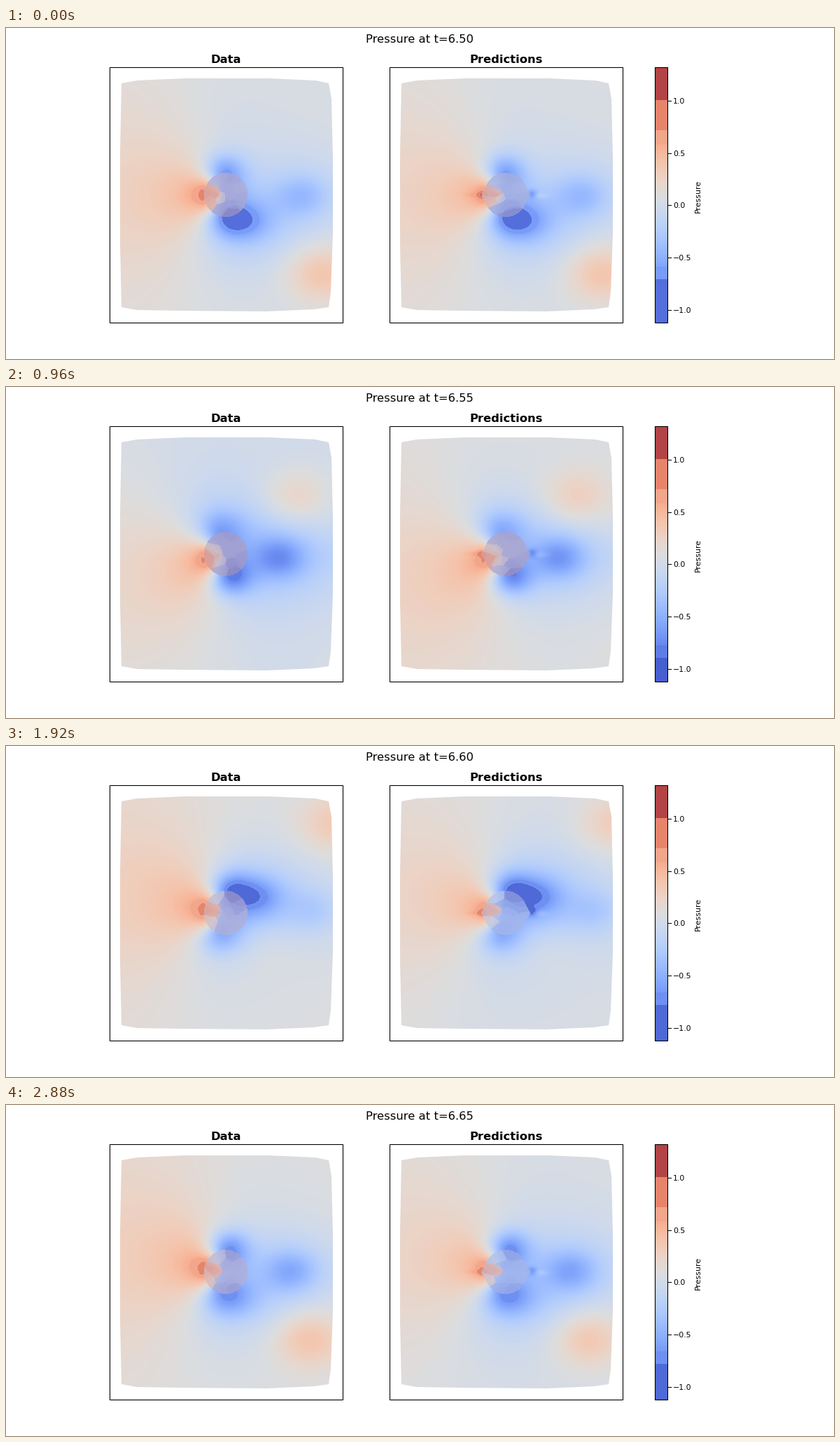
Recreate the animation shown at these times as a matplotlib script. Size 1183 by 473 pixels, loop 3.04 s.

```python
import numpy as np
import matplotlib.pyplot as plt
from matplotlib.animation import FuncAnimation
from matplotlib.colors import to_rgb
from matplotlib.patches import Polygon, Rectangle

W, H, DPI = 1183, 473, 100
FRAMES, STEP = 19, 160
VMIN, VMAX = -1.12, 1.32
TOP, BAR = 56.5, 364          # colour bar top and height in pixels
SHIFT = 400                   # distance between the two panels
PERIOD = 20                   # frames per vortex shedding cycle
X0, X1, Y0, Y1 = 160, 470, 70, 408
CX, CY, R = 314, 239, 31      # cylinder
X, Y = np.meshgrid(np.arange(X0, X1) + .5, np.arange(Y0, Y1) + .5)
BIG, SMALL, LINE = 11.83, 7.89, .79

plt.rcParams["font.family"] = "DejaVu Sans"


def wave(k, period=PERIOD):
    return np.cos(2 * np.pi * k / period)


def mix(a, b, t):
    return (1 - t) * np.array(to_rgb(a)) + t * np.array(to_rgb(b))


def blob(x, y, sx, sy, amp):
    return amp * np.exp(-((X - x) / sx) ** 2 / 2 - ((Y - y) / sy) ** 2 / 2)


def front(k):
    """High pressure before the cylinder, fading around its sides."""
    tilt = .38 * wave(k - PERIOD / 4)
    dx, dy = X - CX + 6, Y - CY
    r = np.maximum(np.hypot(dx, dy), 1)
    facing = (dy * np.sin(tilt) - dx * np.cos(tilt)) / r
    lobe = 1.3 * np.clip((facing + .35) / 1.35, 0, 1) ** 2 - .3
    return lobe * (30 / np.maximum(r, 29)) ** .95


def vortex(age, side):
    """Low pressure that leaves the cylinder and drifts downstream."""
    x = 341 + 8.3 * age
    y = CY + side * (44 * np.exp(-max(age, 0) / 4.5) - 6)
    amp = -np.exp(-((age - 4) / 8) ** 2)
    return blob(x, y, 26, 20, .45 * amp) + blob(x, y, 55, 45, .28 * amp)


def crest(age, side):
    """Weak high pressure that drifts out on the other side."""
    amp = .36 * np.exp(-((age - 9) / 5.5) ** 2)
    return blob(360 + 9 * age, CY - side * (31 + 8 * age), 34, 28, amp)


def suction(age, side):
    return blob(314 + 8 * wave(age - 4), CY + side * 33, 22, 18,
                -.36 - .22 * wave(age - 6))


def pressure(k, panel):
    p = .09 - (.05 - .07 * panel) * wave(k - PERIOD / 4)
    p = p + (.82 - .07 * panel) * front(k)
    for n in range(-2, 4):
        age, side = k - n * PERIOD / 2, 1 - 2 * (n % 2)
        p += vortex(age, side) + crest(age, side)
    p += suction(k, 1) + suction(k + PERIOD / 2, -1)
    if panel:
        p += blob(280, 239, 4, 2.5, .3) + blob(270, 239, 10, 2, .08)
        p += blob(352, 238, 5, 4, -.3) + blob(362, 240, 9, 2.5, .12)
    return p


def scale(k):
    """Colour scale whose ends are merged into flat bands."""
    lut = plt.get_cmap("coolwarm")(np.linspace(1, 0, BAR))[:, :3]
    low = int(318 - 16 * wave(k, PERIOD / 2))
    for a, b in ((low - 18, low), (low, BAR)):
        lut[a:b] = lut[a:b].mean(axis=0)
    for a, b, color in ((0, 47, "#b34446"), (47, 90, "#e6856c"), (90, 110, "#f2a68c")):
        lut[a:b] = to_rgb(color)
    return lut


def cylinder(panel):
    dx, dy = np.abs(X - CX), np.abs(Y - CY)
    inside = np.hypot(dx, dy) < R
    if panel:
        inside |= (.857 * dx + .515 * dy < 30) & (dx > 25)
    return inside


HOLES = [cylinder(0), cylinder(1)]
TINTS = [("#c8b4c4", "#be98a8"), ("#b2c4ec", "#c29ca8")]
SPIRAL = np.arange(12)
SITE_R, SITE_A = 28 * np.sqrt((SPIRAL + .5) / 12), 2.4 * SPIRAL


def facets(k, panel, img):
    jitter = np.random.default_rng(k).uniform(-3, 3, (2, SPIRAL.size))
    sx = CX + SITE_R * np.cos(SITE_A) + jitter[0]
    sy = CY + SITE_R * np.sin(SITE_A) + jitter[1]
    tint = mix(*TINTS[panel], (1 + wave(k - PERIOD / 4)) / 2)
    colors = .4 * img[(sy - Y0).astype(int), (sx - X0).astype(int)] + .6 * tint
    hole = HOLES[panel]
    gap = ((X[hole][:, None] - sx) ** 2
           + ((Y[hole][:, None] - sy) * (1 + .8 * panel)) ** 2)
    img[hole] = .8 * colors[gap.argmin(axis=1)] + .2 * img[hole]


def picture(k, panel, lut):
    row = (VMAX - pressure(k, panel)) / (VMAX - VMIN) * BAR
    img = lut[np.clip(row, 0, BAR - 1).astype(int)]
    facets(k, panel, img)
    return img


fig = plt.figure(figsize=(W / DPI, H / DPI), dpi=DPI, facecolor="white")
ax = fig.add_axes([0, 0, 1, 1])
ax.axis("off")

HULL = np.array([(165, 79), (187, 75), (255, 72), (375, 72), (442, 75),
                 (461, 79), (465, 101), (467, 185), (467, 295), (464, 378),
                 (461, 399), (440, 402), (372, 405), (250, 404), (187, 403),
                 (165, 399), (163, 310), (163, 180)])


def frame_box(x, w):
    ax.add_patch(Rectangle((x, TOP), w, BAR, fill=False, ec="black",
                           lw=LINE, zorder=3))


panels = []
for i, name in enumerate(("Data", "Predictions")):
    off = i * SHIFT
    im = ax.imshow(np.ones((Y1 - Y0, X1 - X0, 3)), aspect="auto",
                   interpolation="nearest",
                   extent=(X0 + off, X1 + off, Y1, Y0))
    im.set_clip_path(Polygon(HULL + (off, 0), transform=ax.transData))
    panels.append(im)
    frame_box(148.5 + off, 333)
    ax.text(314.5 + off, 50.5, name, ha="center", va="baseline", fontsize=BIG,
            weight="bold")

bar = ax.imshow(np.ones((BAR, 1, 3)), aspect="auto", interpolation="nearest",
                extent=(927.5, 945.5, TOP + BAR, TOP))
frame_box(927.5, 18)
for v in (1, .5, 0, -.5, -1):
    y = TOP + (VMAX - v) / (VMAX - VMIN) * BAR
    ax.plot([946, 950], [y, y], color="black", lw=LINE)
    ax.text(953, y, f"{v:.1f}".replace("-", "\u2212"), fontsize=SMALL,
            va="center_baseline")
ax.text(989, 240, "Pressure", fontsize=SMALL, rotation=90, ha="center", va="center")
title = ax.text(W / 2 - .5, 8.7, "", fontsize=BIG, ha="center", va="top")
ax.set_xlim(0, W)
ax.set_ylim(H, 0)


def update(k):
    lut = scale(k)
    for i, im in enumerate(panels):
        im.set_data(picture(k, i, lut))
    bar.set_data(lut[:, None])
    title.set_text(f"Pressure at t={6.503 + .0083 * k:.2f}")
    return [*panels, bar, title]


anim = FuncAnimation(fig, update, frames=FRAMES, interval=STEP, repeat=True,
                     repeat_delay=0, blit=False)
plt.show()
```
